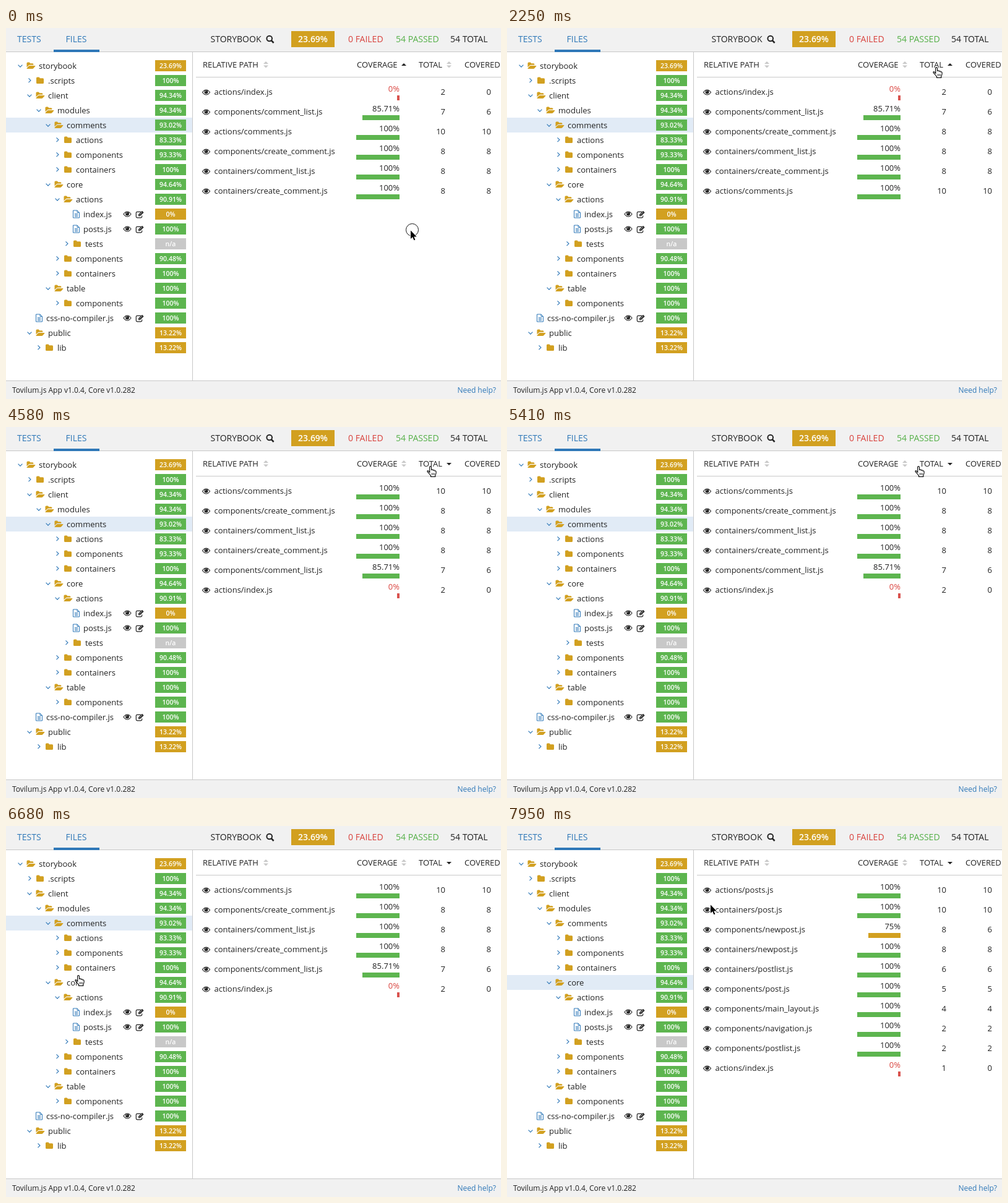
An HTML page for the animation above (8000 ms loop, 800 px wide and 600 px high).

```html
<!DOCTYPE html>
<html lang="en">
<head>
<meta charset="utf-8">
<title>Coverage browser</title>
<style>
  html, body { margin: 0; width: 100%; height: 100%; overflow: hidden; background: #fff; }
  svg { display: block; width: 800px; height: 600px; }
  text { font: 13px "Open Sans", sans-serif; fill: #222; }
  .big { font-size: 14px; }
  .small { font-size: 12px; }
  .badge { font-size: 10.5px; font-weight: 600; fill: #fff; text-anchor: middle; }
  .badge.big { font-size: 14px; }
  .end { text-anchor: end; }
  .blue { fill: #2f78b8; }
  .red { fill: #d9433e; }
  .green { fill: #55b048; }
  .line { fill: none; stroke: #2f78b8; stroke-width: 1.2; }
</style>
</head>
<body>
<svg viewBox="0 0 800 600">
  <defs>
    <path id="closed" fill="#d2a020" d="M-6-4q0-1.5 1.5-1.5h2.6q1.5 0 1.5 1.5v.3h4.9q1.5 0 1.5 1.5v5.7q0 1.5-1.5 1.5h-9q-1.5 0-1.5-1.5z"/>
    <path id="open" fill="#d2a020" d="M-6.5 2.5V-4q0-1.5 1.5-1.5h2.4q1.5 0 1.5 1.5v.3h4q1.5 0 1.5 1.5v.9h-5.6q-1.6 0-2.7 1.2zM-6.2 5q-.8 0-.2-.8l2.7-3.3q1-1 2.2-1h8.4q1 0 .4.9l-2.7 3.2q-.9 1-2.2 1z"/>
    <path id="right" class="line" d="M-1.5-3.6L1.9-.2-1.5 3.2"/>
    <path id="down" class="line" d="M-3.4-1.3L0 2.1 3.4-1.3"/>
    <g id="file" class="line">
      <path d="M-5-6H1.5L5-2.5V6H-5zM1.5-6v3.5H5M-2.7-.4h5.4M-2.7 1.7h5.4M-2.7 3.8h5.4" stroke-width="1"/>
    </g>
    <g id="eye">
      <path d="M-6 0Q-3.3-4 0-4T6 0Q3.3 4 0 4T-6 0z" fill="#fff" stroke="#222" stroke-width="1.2"/>
      <circle cy="-.5" r="3" fill="#222"/>
      <path d="M-1.6-.7Q-1.5-2.2 0-2.3" fill="none" stroke="#fff" stroke-width=".7"/>
    </g>
    <g id="edit">
      <path d="M2-4.6h-6q-1.7 0-1.7 1.7v6q0 1.7 1.7 1.7h6q1.7 0 1.7-1.7V1.4" fill="none" stroke="#222" stroke-width="1.2"/>
      <path d="M-2 2.3V-.4L4-6.2 6.6-3.6.7 2.3z" fill="#222"/>
      <path d="M-.9.2L.4 1.4M.2-.4L4-4.1" stroke="#fff" stroke-width=".7"/>
    </g>
  </defs>

  <path fill="#f1f1f1" d="M0 0h800v38H0zM0 571h800v29H0z"/>
  <path fill="#c8c8c8" d="M0 38h800v1H0zM0 570h800v1H0zM301 39h1v531h-1zM307 79h493v1H307z"/>
  <path fill="#2f78b8" d="M77 35h74v4H77z"/>
  <text class="big blue" x="18" y="23">TESTS</text>
  <text class="big blue" x="96.500" y="23">FILES</text>
  <text class="big" x="330.500" y="23">STORYBOOK</text>
  <g fill="none" stroke="#222" stroke-width="2"><circle cx="425.700" cy="17" r="4.300"/><path d="M428.800 20.200l3.800 3.800" stroke-width="2.500"/></g>
  <path fill="#d2a020" d="M461 5h70v26h-70z"/>
  <text class="badge big" x="496" y="23">23.69%</text>
  <text class="big red" x="553" y="23">0 FAILED</text>
  <text class="big green" x="630" y="23">54 PASSED</text>
  <text class="big" x="718" y="23">54 TOTAL</text>
  <text class="small" x="10" y="590">Tovilum.js App v1.0.4, Core v1.0.282</text>
  <text class="small blue end" x="792" y="590">Need help?</text>
  <text x="318" y="64">RELATIVE PATH</text>
  <text x="567" y="64">COVERAGE</text>
  <text x="667" y="64">TOTAL</text>
  <text x="741" y="64">COVERED</text>

  <rect id="mark" width="301" height="24" fill="#e1ebf6"/>
  <g id="tree"></g>
  <g id="table"></g>
  <g id="cursor">
    <circle id="ring" cx="10.500" cy="10.500" r="10" fill="none" stroke="#111"/>
    <path id="arrow" transform="translate(7 10)" d="M1 1.500V15l3.100-2.900 2.300 5.200 2-.9-2.200-5H10.600z" stroke="#fff" stroke-width="1.600" paint-order="stroke"/>
    <g id="hand" transform="translate(4 12)" stroke="#111" stroke-width="1.200" stroke-linejoin="round">
      <path fill="#fff" d="M4.800 10.500L4.600 2Q4.700.6 6 .6T7.400 2L7.600 6.500Q8 5.600 9.200 5.800T10.400 7.200Q11 6.400 12 6.700T13 8.200Q13.600 7.600 14.400 8T15.200 10Q15.100 13 13.800 14.800V17.400H6.500V15.500Q4 13 2.800 11 .3 8.800 1.100 8T3.300 8.600z"/>
      <path d="M8.300 11.500v3M10.300 11.500v3M12.300 11.500v3" stroke-width=".9"/>
    </g>
  </g>
</svg>
<script>
const $ = id => document.getElementById(id);
const GREEN = '#5db54f', GOLD = '#d2a020', RED = '#d9534f', GREY = '#c8c8c8';
const icon = (id, x, y) => `<use href="#${id}" x="${x}" y="${y}"/>`;
const text = (s, x, y, cls = '') => `<text x="${x}" y="${y}" class="${cls}">${s}</text>`;
const rect = (x, y, w, h, fill) => `<rect x="${x}" y="${y}" width="${w}" height="${h}" fill="${fill}"/>`;

// depth, kind (- open, + closed, = file), name, coverage
const tree = `0-storybook 23.69%
1+.scripts 100%
1-client 94.34%
2-modules 94.34%
3-comments 93.02%
4+actions 83.33%
4+components 93.33%
4+containers 100%
3-core 94.64%
4-actions 90.91%
5=index.js 0%
5=posts.js 100%
5+tests n/a
4+components 90.48%
4+containers 100%
3-table 100%
4+components 100%
1=css-no-compiler.js 100%
1-public 13.22%
2+lib 13.22%`.split('\n');

$('tree').innerHTML = tree.map((row, i) => {
  const y = 61 + 24 * i, x = 15 * row[0], kind = row[1];
  const [name, cover] = row.slice(2).split(' ');
  const fill = cover === 'n/a' ? GREY : parseFloat(cover) < 80 ? GOLD : GREEN;
  const left = kind === '='
    ? icon('file', x + 38.5, y) + text(name, x + 50, y + 5) + icon('eye', 196, y) + icon('edit', 216, y + 1)
    : icon(kind === '-' ? 'down' : 'right', x + 23, y) + icon(kind === '-' ? 'open' : 'closed', x + 40, y) + text(name, x + 53, y + 5);
  return left + rect(241, y - 9, 50, 18, fill) + text(cover, 266, y + 4, 'badge');
}).join('');

// path, total, covered
const comments = [
  ['actions/index', 2, 0], ['components/comment_list', 7, 6], ['actions/comments', 10, 10],
  ['components/create_comment', 8, 8], ['containers/comment_list', 8, 8], ['containers/create_comment', 8, 8]];
const core = [
  ['actions/posts', 10, 10], ['containers/post', 10, 10], ['components/newpost', 8, 6],
  ['containers/newpost', 8, 8], ['containers/postlist', 6, 6], ['components/post', 5, 5],
  ['components/main_layout', 4, 4], ['components/navigation', 2, 2], ['components/postlist', 2, 2],
  ['actions/index', 1, 0]];
const sorted = sign => [...comments].sort((a, b) => sign * (a[1] - b[1]));

// start time, rows, sorted column, direction, marked tree row
const views = [
  [0, comments, 643, 'up', 4],
  [2250, sorted(1), 716, 'up', 4],
  [3420, sorted(-1), 716, 'down', 4],
  [7150, core, 716, 'down', 8]];

const up = (x, y, fill) => `<path fill="${fill}" d="M${x - 4} ${y}h8l-4-4z"/>`;
const down = (x, y, fill) => `<path fill="${fill}" d="M${x - 4} ${y}h8l-4 4z"/>`;

function drawView([, rows, column, dir, marked]) {
  $('mark').setAttribute('y', 49 + 24 * marked);
  const arrows = [420, 643, 716].map(x =>
    x !== column ? up(x, 58, GREY) + down(x, 60.5, GREY)
      : dir === 'up' ? up(x, 61, '#222') : down(x, 58, '#222'));
  const lines = rows.map(([path, total, covered], i) => {
    const y = 103 + 32 * i, part = covered / total, w = Math.max(4, Math.floor(70 * part));
    const fill = !part ? RED : part < .8 ? GOLD : GREEN;
    return icon('eye', 323.5, y + 1) + text(path + '.js', 336.5, y + 5)
      + text(+(part * 100).toFixed(2) + '%', 636, y, part ? 'end' : 'end red')
      + rect(636 - w, y + 6, w, 8, fill)
      + text(total, 710, y + 5, 'end') + text(covered, 784, y + 5, 'end');
  });
  $('table').innerHTML = arrows.concat(lines).join('');
}

// first step, last step, step count, start and end slope, Bezier points
const moves = [
  [900, 1560, 12, 0, 0, [646, 316], [675.3, 229], [688.3, 141], [685, 54]],
  [1740, 1740, 1, 0, 0, [685, 54], [685, 53], [684, 52], [684, 51]],
  [4580, 4580, 1, 0, 0, [684, 51], [682, 51], [679, 51], [676, 51]],
  [4730, 4910, 4, 1, 1, [676, 51], [675, 51], [673, 51], [672, 51]],
  [5090, 5140, 2, 1, 1, [672, 51], [669, 51], [667, 51], [664, 51]],
  [5410, 6180, 14, .1, .53, [664, 51], [496, 51], [327, 51], [159, 143]],
  [6240, 6910, 12, 2.3, 0, [159, 143], [140, 175], [121, 206], [102, 238]],
  [7630, 7950, 5, .3, 1, [102, 238], [175, 201], [248, 157], [321, 116]]];
const clicks = [[0, 90], [2040, 2250], [3330, 3420], [6970, 7150]];

const ease = (p, a, b) => p * p * (3 - 2 * p) + a * p * (1 - p) ** 2 - b * p * p * (1 - p);
function place(t) {
  const move = moves.findLast(m => t >= m[0]);
  if (!move) return moves[0][5];
  const [from, to, n, a, b, ...pts] = move;
  const step = n < 2 ? 1 : Math.min(n, 1 + Math.floor((t - from) / (to - from) * (n - 1) + .05));
  const s = ease(step / n, a, b), r = 1 - s;
  const weights = [r ** 3, 3 * r * r * s, 3 * r * s * s, s ** 3];
  return [0, 1].map(k => Math.round(weights.reduce((sum, w, i) => sum + w * pts[i][k], 0)));
}

const show = (id, on) => $(id).setAttribute('visibility', on ? 'visible' : 'hidden');
let current;
function frame(now) {
  const t = now % 8000;
  const view = views.findLast(v => t >= v[0]);
  if (view !== current) drawView(current = view);
  const [x, y] = place(t);
  const hand = t >= 1740 && !(x > 291 && y > 70);
  $('cursor').setAttribute('transform', `translate(${x} ${y})`);
  show('hand', hand);
  show('arrow', !hand);
  show('ring', clicks.some(([a, b]) => t >= a && t < b));
}
const start = performance.now();
function loop() {
  frame(performance.now() - start);
  requestAnimationFrame(loop);
}
loop();
</script>
</body>
</html>
```
